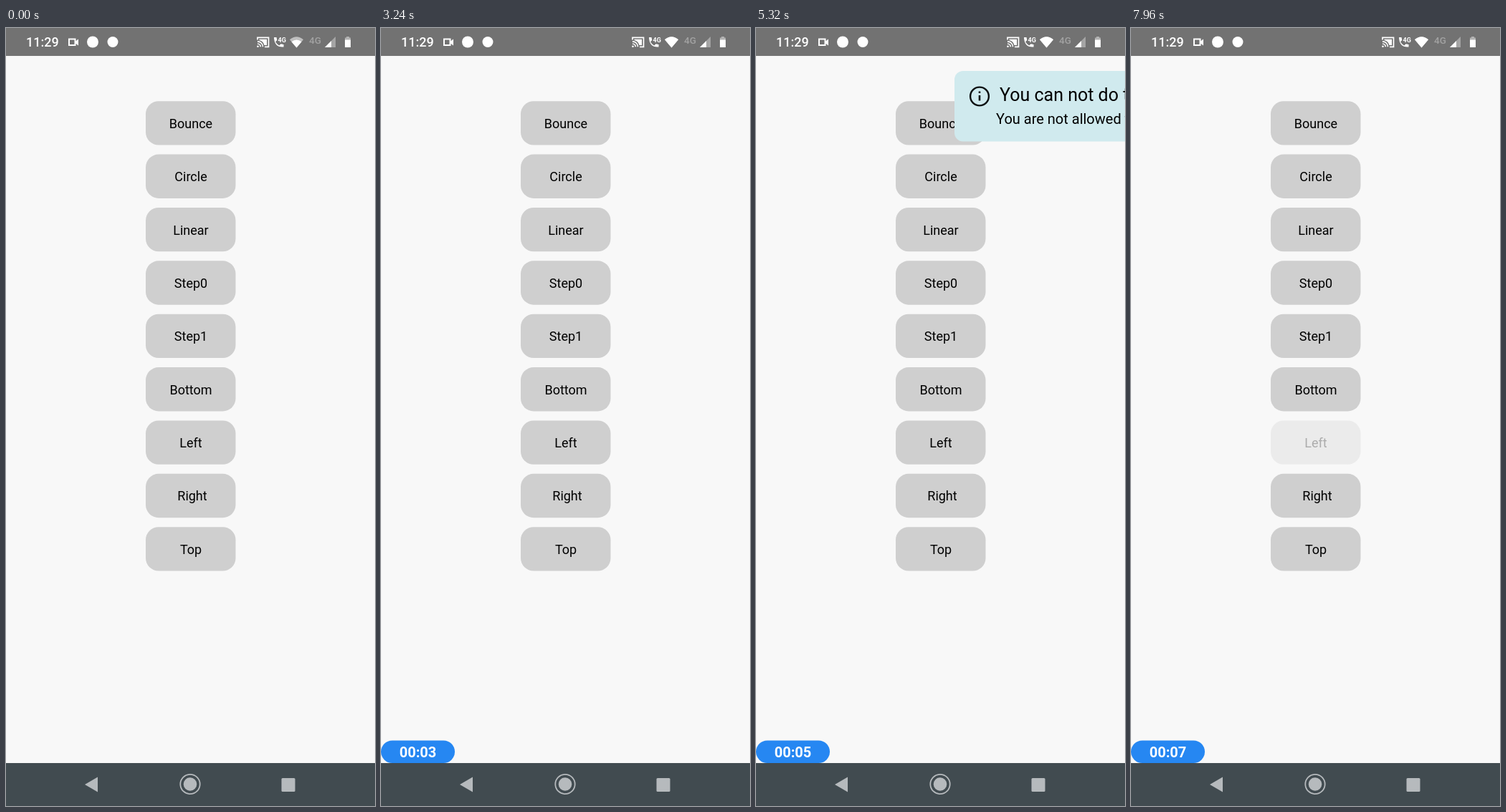
An HTML page for the animation above (8000 ms loop, 515 by 1087 pixels).

```html
<!DOCTYPE html>
<html lang="en">
<head>
<meta charset="utf-8">
<style>
  html, body { margin: 0; width: 100%; height: 100%; overflow: hidden; background: #f8f8f8; }
  svg { display: block; width: 515px; height: 1087px; font-family: Roboto, sans-serif; }
</style>
</head>
<body>
<svg viewBox="0 0 515 1087">
  <rect width="515" height="1087" fill="#f8f8f8"/>
  <g id="buttons" font-size="18" text-anchor="middle"></g>

  <g id="toast" visibility="hidden">
    <rect width="473" height="98.5" rx="12" fill="#d0eaee"/>
    <g fill="none" stroke="#0b0f10">
      <circle cx="35" cy="35.5" r="12.9" stroke-width="2.4"/>
      <path d="M35 34v7.500M35 28.500v2.600" stroke-width="2.600"/>
      <circle cx="442" cy="35.300" r="9.600" stroke-width="2"/>
      <path d="M438.300 31.600l7.400 7.400m0-7.400l-7.400 7.400" stroke-width="2"/>
    </g>
    <text x="63" y="42" font-size="25">You can not do that</text>
    <text x="58" y="74" font-size="20">You are not allowed to perform this action</text>
  </g>

  <g id="pill" visibility="hidden">
    <rect y="995.500" width="103" height="31.500" rx="15.750" fill="#2687f2"/>
    <text id="clock" x="51.500" y="1019" font-size="20" font-weight="700" fill="#fff" text-anchor="middle"></text>
  </g>

  <!-- status bar -->
  <rect width="515" height="39" fill="#727272"/>
  <g fill="#fff">
    <text x="28" y="26" font-size="18" font-weight="500">11:29</text>
    <path d="M88 15.500h8.500v8.500h-8.500z" fill="none" stroke="#fff" stroke-width="2"/>
    <path d="M97 18.500l4-3v9l-4-3z"/>
    <circle cx="121" cy="19.500" r="8"/>
    <circle cx="149" cy="19.500" r="7.500"/>
    <path d="M351 16.500v-3.200h15.500v13h-5.500M351 18.800a7.500 7.500 0 0 1 7.500 7.500M351 22a4.300 4.300 0 0 1 4.300 4.300"
      fill="none" stroke="#fff" stroke-width="1.700"/>
    <path d="M353.500 15.700h10.500v8.200h-3.500a9.500 9.500 0 0 0-7-7z"/>
    <circle cx="351.500" cy="25.800" r="1.300"/>
    <path d="M374 13h3.500l.8 4-2.200 2.200q1.800 3.600 5.200 5.200l2.200-2.200 4 .8v3.500q-13 1-13.500-13.500z"/>
    <text x="379.500" y="20" font-size="9" font-weight="700">4G</text>
    <path d="M396 16.300q9.500-8 19 0l-9.500 11.200z" opacity=".55"/>
    <path id="wifi"/>
    <text x="423" y="21.500" font-size="13.500" font-weight="500" fill="#a2a2a2">4G</text>
    <path d="M460 12v15h-15z" fill="#a5a5a5"/>
    <path d="M454 18v9h-9z"/>
    <path d="M475 12h4v1.500h2v13.500h-8v-13.500h2z" fill="#b2b2b2"/>
    <path d="M473 16.500h8v10.500h-8z"/>
  </g>

  <!-- navigation bar -->
  <rect y="1027" width="515" height="60" fill="#414b50"/>
  <g fill="#b6babd">
    <path d="M110 1057l18-10.500v21z"/>
    <circle cx="257" cy="1056.500" r="9.300"/>
    <circle cx="257" cy="1056.500" r="13.700" fill="none" stroke="#b6babd" stroke-width="1.800"/>
    <rect x="384.500" y="1048" width="19" height="19" rx="1.500"/>
  </g>
</svg>
<script>
const $ = id => document.getElementById(id);
const LOOP = 8000, STEP = 40;
const TICKS = [840, 2040, 2720, 3800, 4880, 5920, 6960];
const REST = { x: 21, y: 60 };
const labels = ['Bounce', 'Circle', 'Linear', 'Step0', 'Step1', 'Bottom', 'Left', 'Right', 'Top'];

$('buttons').innerHTML = labels.map((label, i) => {
  const y = 102.2 + i * 74.38;
  const x = label === 'Right' ? 260 : 258;
  return `<g><rect x="195" y="${y}" width="125.5" height="61.3" rx="18" fill="#cfcfcf"/>
    <text x="${x}" y="${Math.round(y + 37.6)}">${label}</text></g>`;
}).join('');
const [left, right] = [6, 7].map(i => $('buttons').children[i]);

const within = (t, a, b) => t >= a && t < b;

// Steady glide from the right edge that settles with a cubic ease-out.
function slideX(t) {
  const speed = 0.425, brake = 5640;
  if (t < brake) return 515 - speed * (t - 4760);
  const gap = 141 - REST.x, span = 3 * gap / speed;
  return REST.x + gap * (1 - (t - brake) / span) ** 3;
}

function toastAt(t) {
  if (within(t, 2040, 3240)) {
    const k = Math.min(1, (t - 2000) / 320);
    return [REST.x, REST.y - 160 * (1 - k) ** 2];
  }
  if (within(t, 4760, 6280)) return [slideX(t), REST.y];
  return null;
}

function draw(t) {
  const show = (el, on) => el.setAttribute('visibility', on ? 'visible' : 'hidden');
  const pos = toastAt(t);
  show($('toast'), pos);
  if (pos) $('toast').setAttribute('transform', `translate(${pos})`);

  show($('pill'), t >= 40);
  $('clock').textContent = '00:0' + TICKS.filter(s => t >= s).length;

  $('wifi').setAttribute('d', t < 3040
    ? 'M398.500 19.200q7-5.500 14 0l-7 8.300z'
    : 'M396 16.300q9.500-8 19 0l-9.500 11.200z');
  right.setAttribute('opacity', within(t, 4040, 4760) ? 0.2 : 1);
  left.setAttribute('opacity', t < 7040 ? 1 : t < 7960 ? 0.2 : 0.3);
}

const start = performance.now();
function frame() {
  const t = (performance.now() - start) % LOOP;
  draw(Math.floor(t / STEP) * STEP);
  requestAnimationFrame(frame);
}
frame();
</script>
</body>
</html>
```
